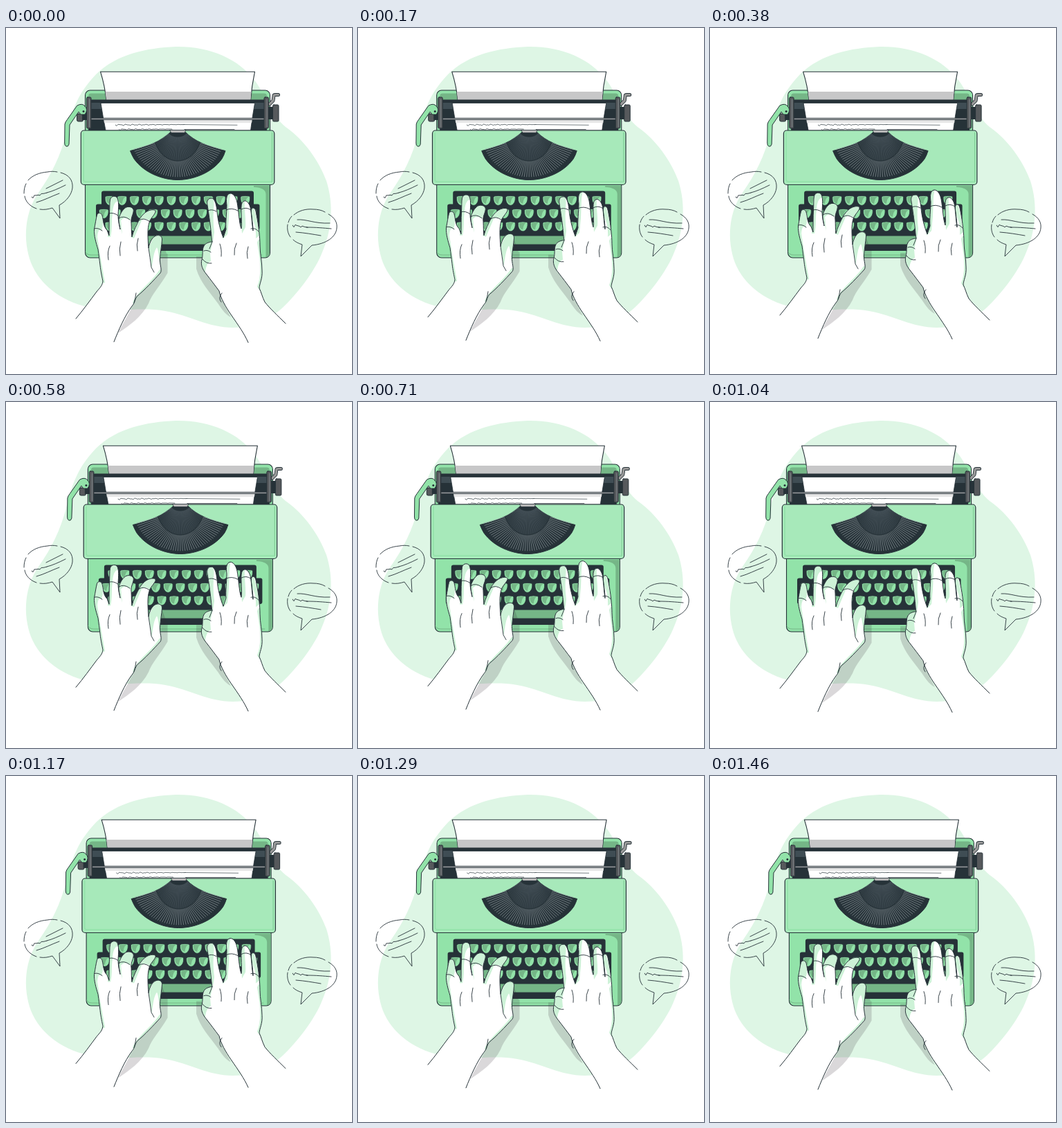
An HTML page with a canvas for the animation above (1.5 s loop, 500 px wide and 500 px high).

```html
<!DOCTYPE html>
<html lang="en">
<head>
<meta charset="utf-8">
<title>Typewriter</title>
<style>
html, body { margin: 0; width: 100%; height: 100%; overflow: hidden; background: #fff; }
canvas { display: block; width: 500px; height: 500px; }
</style>
</head>
<body>
<canvas id="stage"></canvas>
<script>
const LOOP = 1500, FRAMES = 36;
const INK = '#263238', GREEN = '#92e3a9', LIGHT = '#a7e9ba', DEEP = '#75b687', STEEL = '#56595c';

const canvas = document.getElementById('stage');
const ctx = canvas.getContext('2d');
const ratio = window.devicePixelRatio || 1;
canvas.width = canvas.height = 500 * ratio;

function paint(path, fill, stroke, width = 1) {
  if (fill) { ctx.fillStyle = fill; ctx.fill(path); }
  if (stroke) { ctx.strokeStyle = stroke; ctx.lineWidth = width; ctx.stroke(path); }
}
const shape = (d, fill, stroke, width) => paint(new Path2D(d), fill, stroke, width);
const line = (d, color = INK, width = 0.9) => shape(d, null, color, width);
function box(x, y, w, h, r, fill, stroke, width) {
  const p = new Path2D();
  p.roundRect(x, y, w, h, r);
  paint(p, fill, stroke, width);
}

// Wavy handwriting between two points; jitter fades out along the line.
function scribble(x1, y1, x2, y2, amp, color, width) {
  const p = new Path2D(), n = Math.round(Math.abs(x2 - x1) / 2);
  for (let i = 0; i <= n; i++) {
    const u = i / n;
    const wave = amp * Math.sin(i * 1.9) * Math.sin(i * 0.57 + 1) * Math.max(0, 1 - u * 0.9);
    p.lineTo(x1 + (x2 - x1) * u, y1 + (y2 - y1) * u + wave);
  }
  paint(p, null, color, width);
}

function drawBackdrop() {
  shape(`M245 27 C292 26 336 43 361 78 C377 101 383 125 404 143 C430 161 452 191 463 221
    C474 255 471 292 457 324 C447 350 424 380 404 400 C384 420 358 433 328 433
    C292 433 265 415 230 409 C197 403 165 411 128 405 C83 398 49 372 36 339
    C24 306 27 266 47 238 C66 211 79 184 87 153 C97 113 105 94 130 67 C161 37 203 29 245 27Z`, '#def6e5');
}

function drawBubbles() {
  line(`M32 220 C38 213 48 209 60 208 C65 207 69 207 74 208 M79 209 C91 212 97 220 96 231
    C95 240 88 250 77 256 L78 275 L67 260 C61 262 55 263 49 262
    M44 261 C35 258 28 251 27 243 M26 239 C26 233 27 229 29 225`);
  scribble(37, 244, 59, 238, 2.6, INK, 0.9);
  line('M58 232 L82 220 M59 238 C67 236 76 232 86 227 M44 252 C55 249 66 243 77 239');
  line(`M416 270 C423 264 433 261 444 262 C450 262 456 263 461 266 M466 269 C475 274 479 281 478 289
    C477 302 463 312 442 314 L426 330 L428 313 C422 311 418 309 415 306
    M411 302 C407 297 406 290 407 284 M408 281 C409 277 411 274 413 272`);
  line('M421 277 C435 276 445 283 468 282 M419 295 C432 296 443 298 455 300 M434 288 C449 288 458 289 470 290');
  scribble(414, 285, 436, 288, 2.8, INK, 0.9);
}

function drawKey(x, y) {
  const d = 'M-6 -6 Q0 -7.2 6 -6 Q7.4 -5 6.8 -1 C6.2 4 3 7.3 0 7.3 C-3 7.3 -6.2 4 -6.8 -1 Q-7.4 -5 -6 -6Z';
  ctx.save();
  ctx.translate(x, y);
  shape(d, GREEN, INK, 0.8);
  shape('M-5 -5 Q0 -6 5 -5 C2 -4 1 -1 0 5 C-4 4 -6 0 -5 -5Z', DEEP);
  ctx.restore();
}

function drawCarriage() {
  box(114.5, 90, 267, 242, 7, GREEN, INK, 1.1);
  box(119, 94.5, 258, 53, 4, DEEP);
  box(119, 104, 258, 44, 0, INK);
  box(123, 108, 250, 9, 0, '#3f4d54');
  // Knobs, axle and crank
  box(102.5, 124, 9, 11, 2, STEEL, INK);
  box(110, 115, 9, 18, 0, INK);
  box(378, 114, 8, 18, 0, INK);
  box(385.5, 111, 8.5, 24, 1.5, STEEL, INK);
  const crank = 'M381 110 L386 105 L387 98 Q387 96.5 389 96.5 L393.5 96.5';
  line(crank, INK, 5);
  line(crank, '#999', 3.2);
  // Paper
  shape('M136.5 63.2 H359.5 Q355 84 353.5 105 H145 Q143 84 136.5 63.2Z', '#fff', INK, 1.1);
  shape('M143.5 92 H354.5 L353.5 104 H145Z', '#c7c7c8');
  box(120, 103.5, 257, 4.5, 0, INK);
  shape('M137 108.5 H359.5 Q356 128 353.5 148 H144 Q140 128 137 108.5Z', '#fff', INK, 0.8);
  shape('M141 130 H356 L355 137 H142Z', '#e6e6e6');
  scribble(158, 140, 258, 139.5, 1.6, '#555f64', 0.9);
  line('M256 139.5 L334 140.3', '#555f64', 0.8);
  scribble(163, 146.5, 240, 146, 1.5, '#555f64', 0.9);
  line('M258 146.5 H330', '#555f64', 0.9);
  box(121, 130.2, 254, 2.4, 1, '#96999b', INK, 0.7);
  for (const x of [116.5, 373]) {
    box(x, 100, 6.5, 45, 1.5, STEEL, INK);
    line(`M${x + 4} 103 V143`, '#899196', 0.8);
  }
  // Return lever
  shape(`M103 112 Q110 108 114 113 Q119 118 114 125 L108 125 L105 121 L92 140 L91 168
    Q90 172 87 171 Q84.5 170 84.7 166 L85 139 Q85.5 136 88 133Z`, GREEN, INK);
  box(110.5, 119, 3, 3, 1.5, INK);
}

function drawTypeBasket() {
  shape(`M237 151 C226 163 203 172 179.5 177.5 Q182 184 185 189 C199 209 226 219.5 248 219.5
    C271 219.5 298 209 312 189 Q315 184 317 177.5 C293 172 271 163 260 151Z`, INK, INK);
  const spokes = 46;
  const inner = new Path2D(), outer = new Path2D();
  for (let i = 0; i <= spokes; i++) {
    const a = Math.PI * (0.13 + 0.74 * i / spokes), c = Math.cos(a), s = Math.sin(a);
    inner.moveTo(248 + c * 14, 149 + s * 9);
    inner.lineTo(248 + c * 34, 149 + s * 42);
    outer.moveTo(248 + c * 36, 149 + s * 44);
    outer.lineTo(248 + c * 69, 149 + s * 66);
  }
  paint(inner, null, '#56636a', 0.5);
  paint(outer, null, '#96a0a4', 0.65);
  shape('M237 147.5 H260 L258 151.5 H239Z', '#b8b8b8', INK, 0.7);
}

function drawBody() {
  shape('M358 228 H381 V325 Q381 331 375.5 331 V240 Q375 230.5 358 230Z', DEEP);
  line('M115 324 Q117 328 123 328 H370', DEEP, 1);
  box(108.3, 148, 279.5, 78.5, 4.5, LIGHT, INK, 1.2);
  line('M112 151 V219 Q112 222 115 222 H384', GREEN, 1.6);
  line('M384.5 151 V222', '#81cf97', 1.2);
  drawTypeBasket();
  box(150, 299, 196, 23, 1, INK);
  box(163, 300, 170, 13, 1, DEEP, INK);
  shape(`M141 235.5 H355 Q358 235.5 358 238.5 V254.5 H364 Q366.5 254.5 366.5 257 V289 Q366.5 292 363 292
    H358 V296 Q358 299 355 299 H141 Q138 299 138 296 V292 H133 Q130 292 130 289 V257
    Q130 254.5 133 254.5 H138 V238.5 Q138 235.5 141 235.5Z`, INK);
  for (const [x, y, n] of [[150, 249, 12], [141.3, 268, 13], [150, 286.5, 12]])
    for (let i = 0; i < n; i++) drawKey(x + i * 17.8, y);
}

const hands = [
  {
    outline: `M101 420 C112 407 122 393 131 381 C135 376 139 373 140 366 C139 361 137 352 136 343
      C135 334 134 328 133 320 C130 310 127 300 127.5 291 C129 283 130 276 131.5 270 C133 266 138 267 139 271
      C141 278 140 286 146 292 L149 300 C149 290 149 278 149.5 268 C150 260 149.5 253 150.5 248
      C152 242 159 242 161 246 C164 253 162 264 162 272 C162 278 164 284 165 291 C164 285 161.5 279 164 272
      C167 265 170 261 174 259 C179 257 186 260 184 266 C183 271 180 275 181 282 C181.5 290 181 296 182 302
      C184 293 189 284 193 276 C197 270 201 266 206 264 C211 262 217 262 216 266 C214 271 208 276 207 281
      C204 290 205 304 206 318 C207 312 210 304 215 301 C220 298 226 300 225.5 306 C225 314 223 324 222.5 334
      C222 342 226 350 223 354 C213 365 200 379 190 387 C186 392 187 396 182 402 C171 417 163 436 156 453.5`,
    shadow: 'M225 306 L232 326 H233.5 V354 C222 374 211 384 206 398 C196 418 178 430 162 441 C170 424 184 402 190 387 L222 355Z',
    tint: `M124 290 L130 262 L139 266 L140 285 L138 293 C135 290 133 292 132 302 L138 340 L143 368 L136 370Z
      M148 242 L161 242 L162 250 C157 251 154 258 154 269 C152 279 154 290 151 302 L147 302Z
      M162 275 L172 256 L187 259 L179 278 C174 273 170 274 166 278 L168 298Z
      M191 278 L205 262 L219 261 L208 279 C203 275 199 275 196 278 L185 304 L180 302Z
      M206 318 L214 299 L227 299 L223 342 C220 334 221 322 218 317 C214 322 212 334 211 348Z
      M226 350 L188 392 L186 402 L183 397 C188 382 212 366 222 349Z`,
    creases: `M127.5 290 Q133 288 139 293 M149 268 Q155 266 162 271 M163 275 Q170 270 179 277
      M192 278 Q199 273 208 280 M150 315 Q146 323 148 335 M166 309 Q163 319 165 329 M191 304 Q188 313 190 322
      M206 318 Q208 331 210 346 L214 353 M188 383 Q187 391 185 397`
  },
  {
    outline: `M404 427 C393 416 381 405 374 396 C370 388 369 382 366 376 C366 370 371 362 370 350
      C370 338 367 326 367 314 C367 303 365 285 362 270 C361 264 360 260 357 260 C354 260 354 265 355 272
      C356 280 357 288 357 293 C355 280 355 268 353 259 C351 252 347 249 344 250 C339 252 340 260 340 268
      C340 276 341 284 340 290 C337 283 336 262 334 252 C332 243 328 239 324 239 C318 240 318 248 319 256
      C319 268 317 282 318 291 L314 303 C310 293 306 278 305 265 C304 253 301 246 297 246
      C291 246 290 251 291 256 C293 268 295 282 296 292 C297 300 297 304 298 309 C294 309 288 311 286 315
      C283 321 285 328 283 335 C281 342 284 349 289 355 C296 364 302 372 308 380 C310 390 318 404 325 414
      C336 430 344 441 350 454.5`,
    shadow: 'M283 330 H275 V348 C281 368 294 381 304 395 C311 404 315 413 325 418 C317 403 310 391 308 380 L288 354Z',
    tint: `M289 244 L298 244 C302 250 300 258 300 265 C299 276 300 285 301 295 L299 310 L296 292Z
      M317 238 L325 238 C322 248 323 263 322 277 L320 298 L313 305Z
      M338 250 L345 249 C344 263 347 276 346 288 L341 297Z
      M353 260 L358 259 L362 275 L366 300 L361 304 C362 286 357 278 354 272Z
      M299 307 L287 311 L281 340 L288 355 C288 346 291 339 296 337 L295 325Z
      M365 305 L372 315 L372 363 L367 380 L363 374 C371 354 366 329 363 310Z`,
    creases: `M292 264 Q297 261 304 265 M318 263 Q326 259 335 264 M340 262 Q347 258 354 263
      M354 290 Q360 288 365 294 M309 312 Q312 320 311 330 M333 311 Q329 319 330 328 M350 316 Q347 324 349 333
      M298 309 L294 319 M286 322 Q291 320 296 324 M284 334 Q289 341 297 340 M312 383 Q306 390 311 396`
  }
];

function drawHand({ outline, shadow, tint, creases }) {
  shape(shadow, 'rgba(50,40,50,.18)');
  const path = new Path2D(outline);
  paint(path, '#fff');
  ctx.save();
  ctx.clip(path);
  shape(tint, '#cdf2d7');
  ctx.restore();
  paint(path, null, INK, 1);
  line(creases, INK, 0.9);
}

// Cubic timing curve through (.3,.1) and (.5,1), solved by bisection.
function ease(x) {
  const curve = (s, a, b) => 3 * s * (1 - s) * ((1 - s) * a + s * b) + s ** 3;
  let lo = 0, hi = 1;
  for (let i = 0; i < 24; i++) {
    const mid = (lo + hi) / 2;
    if (curve(mid, 0.3, 0.5) < x) lo = mid; else hi = mid;
  }
  return curve(lo, 0.1, 1);
}

const SHAKE = [0, -1, 2, -4, 4, -4, 4, -4, 2, -1, 0];
function shakeAt(u) {
  const i = Math.floor(u * 10 + 1e-9);
  return SHAKE[i] + (SHAKE[i + 1] - SHAKE[i]) * ease(Math.max(0, u * 10 - i));
}

function shifted(x, y, draw) {
  ctx.save();
  ctx.translate(x, y);
  draw();
  ctx.restore();
}

function render() {
  const time = performance.now() % LOOP;
  const u = Math.floor(time / LOOP * FRAMES + 0.15) % FRAMES / FRAMES;
  ctx.setTransform(ratio, 0, 0, ratio, 0, 0);
  ctx.fillStyle = '#fff';
  ctx.fillRect(0, 0, 500, 500);
  ctx.lineCap = ctx.lineJoin = 'round';
  drawBackdrop();
  drawBubbles();
  shifted(shakeAt(u), 0, () => { drawCarriage(); drawBody(); });
  shifted(0, -10 * (1 - Math.abs(1 - 2 * u)), () => hands.forEach(drawHand));
  requestAnimationFrame(render);
}
render();
</script>
</body>
</html>
```
